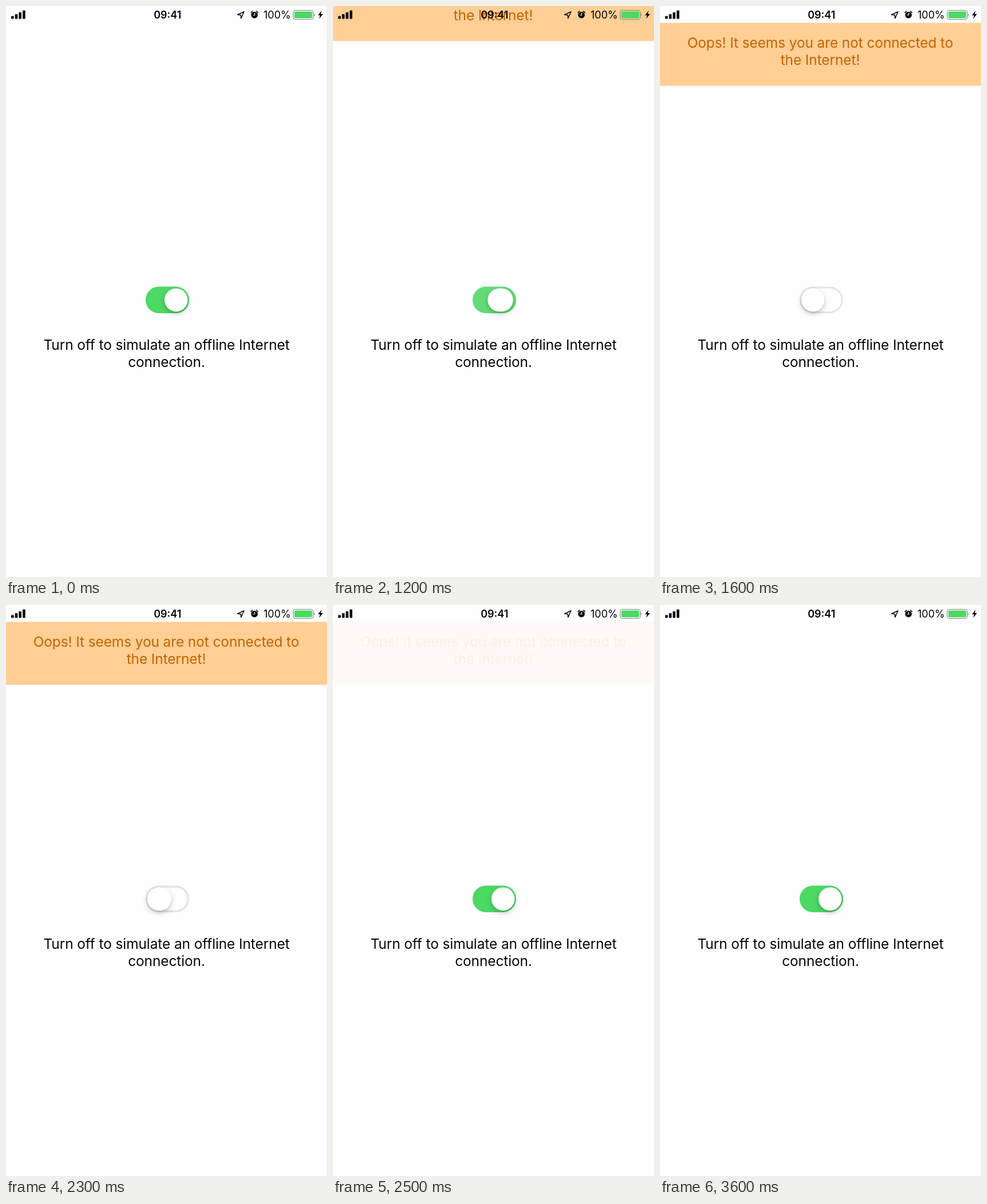
Animation, 561 px wide and 998 px high, one loop 3.7 s. Source, as an HTML page:

```html
<!DOCTYPE html>
<html lang="en">
<head>
<meta charset="utf-8">
<title>Offline banner</title>
<style>
  html, body { margin: 0; width: 100%; height: 100%; overflow: hidden; background: #fefdff; }
  svg { display: block; width: 561px; height: 998px; }
  text { font-family: Inter, "Liberation Sans", sans-serif; font-optical-sizing: none; }
  .body { font-size: 24.5px; letter-spacing: -.005em; text-anchor: middle; }
  .status { font-size: 18px; }
  .line { fill: none; stroke: #050505; stroke-width: 1.5; stroke-linecap: round; stroke-linejoin: round; }
  #thumb { filter: drop-shadow(0 4px 5px rgba(0, 0, 0, .2)) drop-shadow(0 1px 1px rgba(0, 0, 0, .08)); }
</style>
</head>
<body>
<svg viewBox="0 0 561 998">
  <rect width="561" height="998" fill="#fefdff"/>

  <g id="banner">
    <rect y="29.5" width="561" height="110" fill="#ffcf95"/>
    <g class="body" fill="#c66300">
      <text x="280" y="73">Oops! It seems you are not connected to</text>
      <text x="280" y="103">the Internet!</text>
    </g>
  </g>

  <g class="status" fill="#050505">
    <g id="signal"></g>
    <text x="282.3" y="22" font-weight="600" text-anchor="middle">09:41</text>
    <path class="line" d="M416 10 L404.5 15.3 L410.3 15.8 L410.8 21.5 Z"/>
    <circle cx="434.2" cy="15.7" r="5.8"/>
    <path class="line" d="M428 11.6 L430.8 9 M437.6 9 L440.4 11.6"/>
    <path d="M434.6 12 V16 H431.4" fill="none" stroke="#fff" stroke-width="1.2"/>
    <text x="450" y="22">100%</text>
    <rect x="502" y="7.5" width="35" height="16" rx="4" fill="none" stroke="#858585" stroke-width="1.2"/>
    <rect x="504" y="9.5" width="31" height="12" rx="2.2" fill="#4cd964"/>
    <path d="M538.5 12.8 Q541.3 15.5 538.5 18.2 Z" fill="#858585"/>
    <path d="M551.8 8 L545.2 16.3 H549 L547.2 22.6 L554 14 H550 Z"/>
  </g>

  <rect x="244" y="490.5" width="76" height="46.5" rx="23.25" fill="#e5e5e7"/>
  <rect id="green" x="244" y="490.5" width="76" height="46.5" rx="23.25" fill="#4cd964"/>
  <rect id="hole" fill="#fefdff"/>
  <rect id="thumb" y="493.5" height="40.6" rx="20.3" fill="#fff"/>

  <g class="body" fill="#080808">
    <text x="280.5" y="601">Turn off to simulate an offline Internet</text>
    <text x="280.5" y="631">connection.</text>
  </g>
</svg>

<script>
const LOOP = 3700, STEP = 100;
const SWITCH_OFF = 1150, SWITCH_ON = 2280;
const byId = id => document.getElementById(id);

const phase = (t, start, length) => Math.min(1, Math.max(0, (t - start) / length));
const smooth = p => p * p * (3 - 2 * p);
const easeOut = (p, power) => 1 - (1 - p) ** power;
const pulse = (t, peak) => Math.exp(-(((t - peak) / 80) ** 2));
const set = (id, attrs) => {
  for (const name in attrs) byId(id).setAttribute(name, attrs[name]);
};

function drawSwitch(t) {
  const turnedOn = smooth(phase(t, SWITCH_ON, 225));
  const on = 1 - smooth(phase(t, SWITCH_OFF, 200)) + turnedOn;
  set("green", { opacity: on });

  // The white inside keeps growing after the thumb has arrived.
  const open = easeOut(phase(t, SWITCH_OFF + 40, 320), 2) - turnedOn;
  const inset = 23.25 - 20.25 * open;
  set("hole", {
    x: 244 + inset, y: 490.5 + inset,
    width: 76 - 2 * inset, height: 46.5 - 2 * inset, rx: 23.25 - inset,
    visibility: open > .1 ? "visible" : "hidden"
  });

  // A pressed thumb is stretched.
  const width = 40.4 + 4 * (pulse(t, SWITCH_OFF + 50) + pulse(t, SWITCH_ON + 80));
  set("thumb", { x: 267.2 + 30 * on - width / 2, width });
}

function drawBanner(t) {
  const slide = easeOut(phase(t, 1090, 490), 1.3);
  const opacity = 1 - phase(t, 2310, 205);
  set("banner", {
    transform: `translate(0 ${109 * (slide - 1)})`,
    opacity,
    visibility: slide > 0 && opacity > 0 ? "visible" : "hidden"
  });
}

function drawSignal() {
  for (let i = 0; i < 4; i++) {
    const bar = document.createElementNS("http://www.w3.org/2000/svg", "rect");
    const height = 5 + 3.2 * i;
    const attrs = { x: 9 + 6.7 * i, y: 22.4 - height, width: 4.6, height, rx: 1 };
    for (const name in attrs) bar.setAttribute(name, attrs[name]);
    byId("signal").append(bar);
  }
}

function render() {
  // The picture advances ten times per second.
  const t = Math.floor((performance.now() + 4) / STEP) * STEP % LOOP;
  drawSwitch(t);
  drawBanner(t);
  requestAnimationFrame(render);
}
drawSignal();
render();
</script>
</body>
</html>
```
